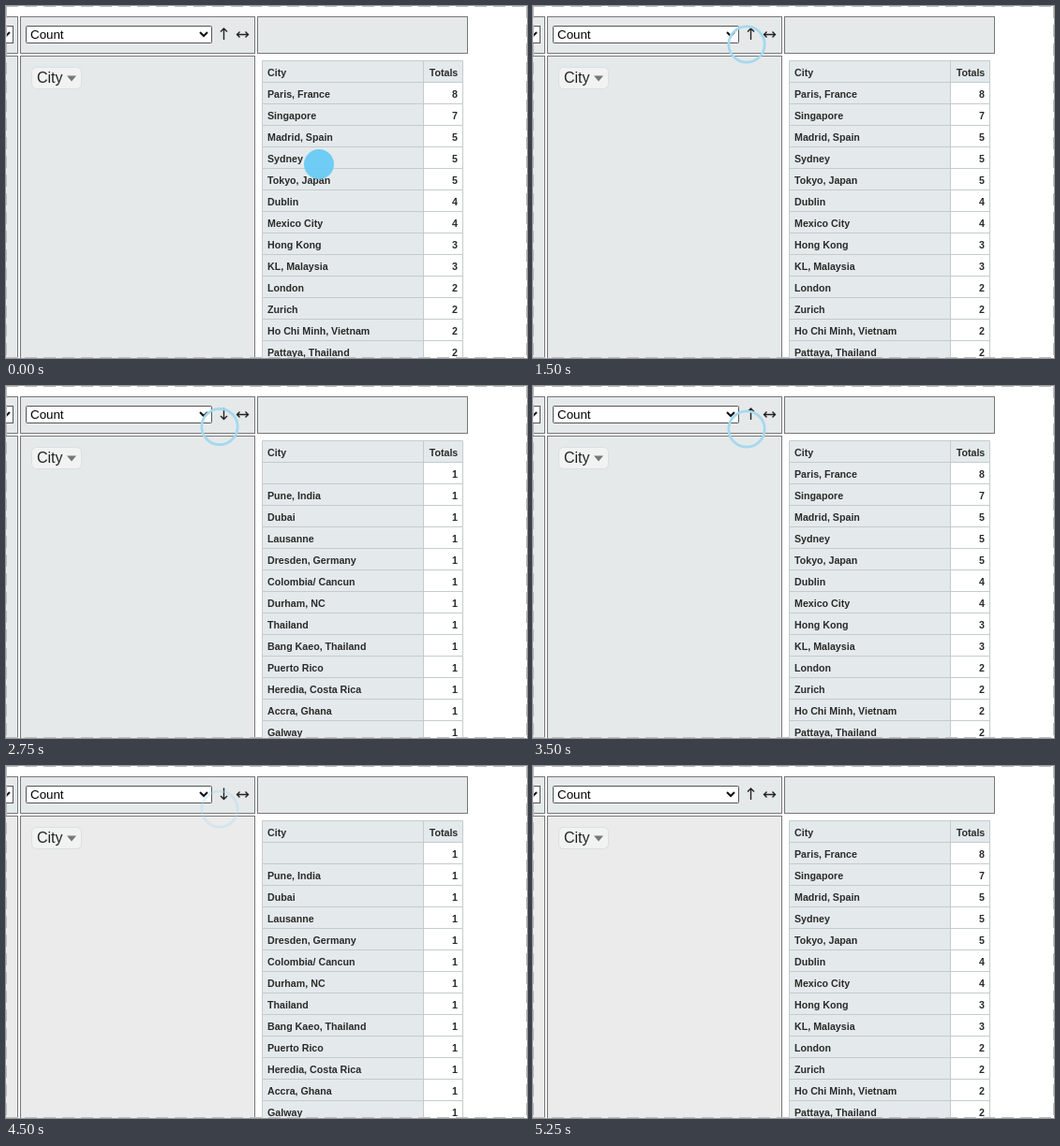
Write an HTML page that moves like this. It is 556x376 px and loops after 5.75 s.

```html
<!DOCTYPE html>
<html lang="en">
<head>
<meta charset="utf-8">
<title>Sorting a pivot table</title>
<style>
html, body { margin: 0; width: 100%; height: 100%; overflow: hidden; background: #fff; }
svg { display: block; width: 556px; height: 376px; font-family: "Liberation Sans", Arial, sans-serif; }
.cell { fill: #e5e9ea; stroke: #777; }
.select { fill: #fff; stroke: #555; }
.chevron { fill: none; stroke: #111; stroke-width: 2; }
.arrow { fill: none; stroke: #222; stroke-width: 1.4; }
.grid { fill: none; stroke: #c5cbcc; }
.table { font-size: 10.667px; font-weight: bold; fill: #2a2a2a; }
.edge { fill: none; stroke: #bdbdbd; stroke-dasharray: 13 7; }
</style>
</head>
<body>
<svg viewBox="0 0 556 376">
  <rect class="cell" x="-9.5" y="11.5" width="22" height="39"/>
  <rect class="cell" x="15.5" y="11.5" width="250" height="39"/>
  <rect class="cell" x="268.5" y="11.5" width="224" height="39"/>
  <rect class="cell panel" x="-9.5" y="53.5" width="22" height="340"/>
  <rect class="cell panel" x="15.5" y="53.5" width="250" height="340"/>

  <rect class="select" x="-9.5" y="21.5" width="17" height="18"/>
  <path class="chevron" d="M-4 28l4 4 4-4"/>
  <rect class="select" x="21.5" y="21.5" width="198" height="18" rx="1"/>
  <text x="26" y="35" font-size="13.333">Count</text>
  <path class="chevron" d="M207 28l4 4 4-4"/>
  <path class="arrow" id="sort"/>
  <path class="arrow" d="M246.5 30.5h12M249.5 27.5l-3 3 3 3M255.5 27.5l3 3-3 3"/>

  <rect x="27.5" y="65.5" width="53" height="23" rx="5" fill="#f1f2f2" stroke="#dcdfdf"/>
  <text x="33" y="82" font-size="16" fill="#222">City</text>
  <path d="M65 74.5h10l-5 6z" fill="#777"/>

  <g class="table" id="table"></g>
  <path class="edge" d="M0 .5H556M.5 0V376M555.5 0V376M0 375.5H556"/>
  <circle id="pointer"/>
</svg>
<script>
const LOOP = 5750, STEP = 250;
const $ = id => document.getElementById(id);

const orders = {
  down: {
    icon: "M232.5 36V24M229 27.5l3.5-3.5 3.5 3.5",
    names: ["Paris, France", "Singapore", "Madrid, Spain", "Sydney", "Tokyo, Japan", "Dublin", "Mexico City",
      "Hong Kong", "KL, Malaysia", "London", "Zurich", "Ho Chi Minh, Vietnam", "Pattaya, Thailand"],
    totals: [8, 7, 5, 5, 5, 4, 4, 3, 3, 2, 2, 2, 2]
  },
  name: {
    icon: "M232.5 23.5V34M229.8 26.2l2.7-2.7 2.7 2.7M229.8 31.3l2.7 2.7 2.7-2.7",
    names: ["", "Accra, Ghana", "Amsterdam", "Armhem, Netherlands", "Athens", "Bang Kaeo, Thailand",
      "Bangladesh / Cambodia / Japan", "Basel, Switzerland", "Bonn", "Brno", "Cairo", "Colombia/ Cancun",
      "Conpiegne, France"]
  },
  up: {
    icon: "M232.5 23.5V35.5M229 32l3.5 3.5 3.5-3.5",
    names: ["", "Pune, India", "Dubai", "Lausanne", "Dresden, Germany", "Colombia/ Cancun", "Durham, NC",
      "Thailand", "Bang Kaeo, Thailand", "Puerto Rico", "Heredia, Costa Rica", "Accra, Ghana", "Galway"]
  }
};

// Each click switches the sort order: [time, order]
const clicks = [[0, "down"], [1750, "name"], [2250, "up"], [3000, "down"],
  [3750, "name"], [4250, "up"], [4750, "down"]];

// Pointer keys: [step, x, y], each held until the next
const moves = [[0, 334, 169], [1, 312, 159], [2, 246.5, 158.5], [3, 228, 56], [4, 228, 48], [5, 228, 31],
  [6, 228, 41], [11, 228, 43.5], [12, 228, 44], [14, 228, 46], [19, 229, 46], [20, 233, 46]];

const latest = (keys, t) => keys.filter(k => k[0] <= t).pop();

function drawTable({ names, totals }) {
  let html = "";
  for (let i = 0; i < 14; i++) {
    const y = 58.5 + 23 * i;
    const right = i ? `x="482" text-anchor="end"` : `x="467" text-anchor="middle"`;
    html += `<rect x="273.5" y="${y}" width="${i ? 172 : 214}" height="23" fill="#e4eaeb"/>
      <path class="grid" d="M273.5 ${y}h214v23h-214zM445.5 ${y}v23"/>
      <text x="279" y="${y + 16}">${i ? names[i - 1] : "City"}</text>
      <text ${right} y="${y + 16}">${i ? (totals ? totals[i - 1] : 1) : "Totals"}</text>`;
  }
  $("table").innerHTML = html;
}

function drawPointer(step) {
  const [, x, y] = latest(moves, step);
  const dot = step < 2;
  const look = {
    cx: x, cy: y,
    r: dot ? 16 : 19.2,
    fill: dot ? "#62c9f5" : "none",
    stroke: dot ? "none" : "#a5d8ef",
    "stroke-width": 2.7,
    opacity: step > 20 ? 0 : step > 17 ? 0.35 : dot ? 0.9 : 1
  };
  for (const key in look) $("pointer").setAttribute(key, look[key]);
}

let shown;
function frame(now) {
  const step = Math.floor(now % LOOP / STEP);
  const order = latest(clicks, step * STEP)[1];
  if (order !== shown) {
    shown = order;
    drawTable(orders[order]);
    $("sort").setAttribute("d", orders[order].icon);
  }
  for (const p of document.querySelectorAll(".panel")) p.style.fill = step > 17 ? "#ebebeb" : "";
  drawPointer(step);
  requestAnimationFrame(frame);
}
frame(performance.now());
</script>
</body>
</html>
```
